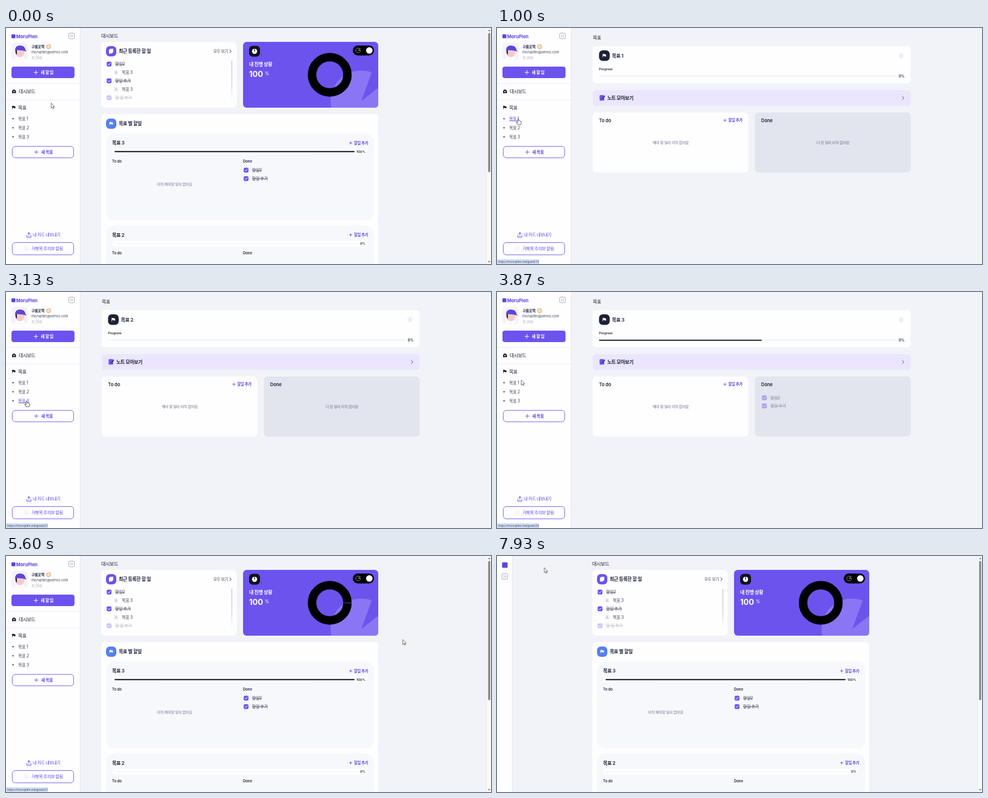
An HTML page that plays this animation: 800 by 391 pixels, repeating every 8000 ms.

```html
<!DOCTYPE html>
<html lang="ko">
<head>
<meta charset="utf-8">
<title>Dashboard tour</title>
<style>
  html, body { margin: 0; width: 100%; height: 100%; overflow: hidden; background: #f1f3f8; }
  svg { display: block; width: 100vw; height: 100vh; }
  text { font-family: Inter, "Noto Sans CJK KR", "Noto Sans CJK", sans-serif; white-space: pre; }
  .url { font-family: "Open Sans", "Noto Sans", sans-serif; }
</style>
</head>
<body>
<svg id="stage" viewBox="0 0 800 391" xmlns="http://www.w3.org/2000/svg"></svg>
<script>
const LOOP = 8000, STEP = 200 / 3;
const INK = '#1b2033', BODY = '#40465a', PURPLE = '#6c53ee', LINK = '#5b45df', CARD = '#fefdff', DARK = '#1e2235';

// --- drawing helpers; text is placed by its vertical centre ---
const text = (x, cy, str, size, { fill = INK, weight = 400, extra = '' } = {}) => {
  const spacing = /[가-힣]/.test(str) ? -0.05 * size : 0;
  return `<text x="${x}" y="${cy + 0.37 * size}" font-size="${size}" font-weight="${weight}" fill="${fill}" letter-spacing="${spacing}" ${extra}>${str}</text>`;
};
const rect = (x, y, w, h, r, fill, extra = '') =>
  `<rect x="${x}" y="${y}" width="${w}" height="${h}" rx="${r}" fill="${fill}" ${extra}/>`;
const circle = (x, y, r, fill, extra = '') => `<circle cx="${x}" cy="${y}" r="${r}" fill="${fill}" ${extra}/>`;
const line = (d, color, width = 1, extra = '') =>
  `<path d="${d}" fill="none" stroke="${color}" stroke-width="${width}" stroke-linecap="round" stroke-linejoin="round" ${extra}/>`;
const group = (id, content, extra = '') => `<g id="${id}" ${extra}>${content}</g>`;
const outline = (x, y, w, h, r, color, width = 0.8) =>
  rect(x, y, w, h, r, 'none', `stroke="${color}" stroke-width="${width}"`);
const plus = (x, y, r, color, width) => line(`M${x - r} ${y}h${2 * r}M${x} ${y - r}v${2 * r}`, color, width);
const chevron = (x, y, r, color, width = 0.9, dir = 1) =>
  line(`M${x - dir * r / 2} ${y - r}l${dir * r} ${r}l${-dir * r} ${r}`, color, width);
const flag = (x, y, s, color) =>
  `<path transform="translate(${x} ${y}) scale(${s})" d="M-3-3H0.3L0.7-2.2H3V1.4H0.3L-0.1.6H-2.2V3H-3Z" fill="${color}"/>`;
const check = (x, y) => rect(x - 4, y - 4, 8, 8, 2, PURPLE) + line(`M${x - 2} ${y}l1.5 1.6l2.7-3`, '#fff', 1);
const task = (x, y, label) => check(x, y) +
  text(x + 9.8, y, label, 7, { fill: BODY, extra: 'text-decoration="line-through"' });
const addTask = (x, y) => plus(x - 5.5, y, 2.2, LINK, 0.8) + text(x, y, '할일 추가', 6.3, { fill: LINK, weight: 600 });

// --- sidebar ---
const toggleButton = (x, y, dir) => outline(x, y, 9.6, 9.4, 2.5, '#8b8f9c', 0.7) +
  [3.6, 6.2].map(dx => chevron(x + dx, y + 4.7, 1.8, '#777b88', 0.6, dir)).join('');

const avatar = rect(9, 25, 27, 28, 6, '#f4f3f9') +
  '<path d="M16 36h14v5q-1 7-7 7t-7-6z" fill="#f6c9c6"/>' +
  '<path d="M15.5 36l2.5 1v7q-3-1-2.5-8z" fill="#2c2844"/>' +
  '<path d="M15 37q0-8 8-8t9 7l2 3q-9-3-19-2z" fill="#5b46d8"/>' +
  '<path d="M16 47q7 4 13 0l2 5H14z" fill="#fff"/>';

const goalLinks = [1, 2, 3].map(n => {
  const y = 135 + 15 * n;
  return circle(11.6, y + 0.3, 1.1, INK) + group('link' + n, text(20, y, '목표 ' + n, 7, { fill: 'inherit' }).replace('fill="inherit"', ''));
}).join('');

const openSidebar =
  rect(9, 10.5, 6.5, 6.5, 1, LINK) + text(16.7, 14, 'MoruPlen', 7.5, { fill: LINK, weight: 700 }) +
  toggleButton(103.3, 8.4, -1) + avatar +
  text(42, 31, '구름호떡', 6.1, { weight: 700 }) + circle(70.3, 31, 4.2, '#e3c99b') + circle(70.3, 31, 2.3, '#f3e5c6') +
  text(42, 40.2, 'moruplen@senvu.com', 5.7, { fill: BODY }) +
  text(42, 49.3, '로그아웃', 5.1, { fill: '#9ca0ac' }) +
  rect(9, 64, 104, 19, 4, PURPLE) + plus(49.3, 73.5, 3.1, '#fff', 0.9) + text(57.3, 73.5, '새 할 일', 7, { fill: '#fff', weight: 700 }) +
  line('M0 92h122M0 119h122', '#e6e7ee', 0.8) +
  '<path d="M10 104l3.2-2.6l3.2 2.6v4.1h-6.4z" fill="#1b2033"/>' + circle(13.2, 105.4, 1.1, '#fff') +
  text(21, 105.2, '대시보드', 7.8, { weight: 500 }) +
  flag(12.8, 131.8, 0.9, INK) + text(20, 131.8, '목표', 7.8, { weight: 500 }) + goalLinks +
  outline(10.4, 196.2, 101.2, 18.8, 5, LINK) + plus(50, 205.6, 3, LINK, 0.8) + text(58, 205.6, '새 목표', 6.8, { fill: LINK, weight: 600 }) +
  line('M34.3 343.7v2.8h6.8v-2.8M37.7 344v-5M35.4 341.2l2.3-2.4l2.3 2.4', LINK, 0.9) +
  text(44, 342.8, '내 카드 내보내기', 7, { fill: LINK, weight: 500 }) +
  outline(10.4, 355.4, 101.2, 20.4, 5, LINK) + rect(29.5, 361.5, 8, 8, 2, '#f7f5fd') +
  text(42, 365.4, '거북목 주의보 알림', 7, { fill: LINK, weight: 500 });

const sidebar =
  '<clipPath id="sideClip"><rect id="sideShape" height="391"/></clipPath>' +
  group('side', rect(0, 0, 122, 391, 0, CARD) + group('sideOpen', openSidebar) +
    group('sideClosed', rect(8.4, 10.5, 9, 9, 1, LINK) + toggleButton(7.8, 29.2, 1)), 'clip-path="url(#sideClip)"') +
  '<path id="sideEdge" d="M0 0V391" stroke="#e1e4ec" stroke-width=".8"/>';

// --- dashboard ---
const subGoal = y => circle(181.6, y, 4, '#f1f2f7') + line(`M181.6 ${y - 2}v2.2l-1.7 1.6M181.6 ${y}l1.7 1.8`, '#8d92a2', 0.7) +
  text(191, y, '목표 3', 7, { fill: BODY });

const goalPanel = (y, n, done) => rect(165, y, 442, 144, 14, '#f6f8fc') +
  text(175, y + 15.4, '목표 ' + n, 8, { weight: 600 }) + addTask(574, y + 15.4) +
  rect(175, y + 25, 421, 9.4, 4.7, '#fff') +
  (done ? rect(179, y + 28.8, 396, 1.9, 1, '#111526') : rect(179, y + 29.4, 402, 0.8, 0.4, '#e9ecf3')) +
  text(done ? 578 : 584, y + 29.7, done ? '100%' : '0%', 5.4, { weight: 600 }) +
  text(175, y + 45.5, 'To do', 5.9, { weight: 600 }) + text(391, y + 45.5, 'Done', 5.9, { weight: 600 }) +
  (done ? task(396, y + 60.5, '할일2') + task(396, y + 74.5, '할일 추가') : '') +
  text(249, y + 83.7, '아직 해야할 일이 없어요', 6.2, { fill: '#737989' });

const dashboard =
  text(157, 13, '대시보드', 8, { weight: 500 }) +
  rect(157, 23, 223.5, 109, 6, CARD) + rect(165, 30, 17, 17, 6, PURPLE) +
  '<path d="M171.8 34.5h5.2v5.2l-2.6 2.6h-4.6v-5.8z" fill="#fff"/>' +
  text(186, 38.5, '최근 등록한 할 일', 7.9, { weight: 600 }) +
  text(342, 38.3, '모두 보기', 6.5, { fill: BODY, weight: 500 }) + chevron(370.3, 38.4, 2.3, INK) +
  task(170, 59.8, '할일2') + subGoal(73.6) + task(170, 87.6, '할일 추가') + subGoal(101.5) +
  `<g opacity=".33">${task(170, 115.4, '할 일 추가')}</g>` +
  rect(371.8, 54, 1.4, 66, 0.7, 'url(#fade)') +
  rect(391, 23, 223, 109, 6, PURPLE) +
  '<path d="M586 121L614 99V126q0 6-6 6H536.6A50.5 50.5 0 0 1 603.2 73.5Z" fill="#8a76f4"/>' +
  rect(401, 29.5, 18, 18, 6, '#12121f') + circle(410, 38.6, 4.3, '#fff') + line('M410 38.6V34.6', '#12121f', 1.2) +
  text(401, 60, '내 진행 상황', 8, { fill: '#fff', weight: 600 }) +
  text(401, 76, '100', 13, { fill: '#fff', weight: 700 }) + text(427, 75.4, '%', 7, { fill: '#fff', weight: 600 }) +
  rect(572, 29, 35, 16.4, 8.2, '#000') + circle(599.3, 37.2, 5.4, '#fff') +
  line('M581 37.2h4a4 4 0 1 1-1.4-3.1zM582.6 35.8l2-1.4', '#b9b9c2', 0.7) +
  circle(534, 77.5, 29.2, 'none', 'id="ring" stroke="#000" stroke-width="14" pathLength="1" transform="matrix(1 0 0 -1 0 155)"') +
  rect(157, 142.5, 457, 270, 6, CARD) + rect(165, 150, 17, 17, 6, '#5680ee') + flag(173.5, 158.5, 0.95, '#fff') +
  text(186, 158.3, '목표 별 할일', 7.9, { weight: 600 }) +
  goalPanel(175, 3, true) + goalPanel(327.3, 2, false) +
  rect(794, 0, 6, 391, 0, '#fafafa') + rect(795.3, 8, 3.4, 231, 1.7, '#85878b') +
  '<path d="M795 5.2l2-2.7l2 2.7zM795 386.2l2 2.7l2-2.7z" fill="#77797d"/>';

// --- goal page ---
const goalPage =
  text(158, 16.3, '목표', 7.8, { weight: 500 }) +
  rect(157.7, 30, 524.6, 61.5, 5, CARD) + rect(168.3, 37, 17.6, 17.6, 6, DARK) + flag(177.1, 45.8, 0.95, '#fff') +
  '<text id="goalTitle" x="189.5" y="48.6" font-size="8" font-weight="600" letter-spacing="-.35" fill="#1b2033"/>' +
  circle(666.4, 46, 4.8, '#f4f5f9') + [-1.8, 0, 1.8].map(d => circle(666.4, 46 + d, 0.5, '#9a9eac')).join('') +
  text(168.3, 68.3, 'Progress', 5.2, { weight: 600 }) +
  rect(168.3, 79.4, 489.5, 0.9, 0.4, '#dde3ec') + rect(168.3, 78.9, 0, 1.9, 0.9, '#111526', 'id="bar"') +
  rect(655, 76, 20, 8, 0, CARD, 'id="barEnd"') +
  '<text id="percent" x="672" y="81.8" text-anchor="end" font-size="5.5" font-weight="600" fill="#1b2033"/>' +
  rect(157.7, 103, 524.6, 26, 5, '#ebe6fd') +
  rect(169.3, 111.3, 7.5, 9, 1, PURPLE) + line('M174 117.2l3.8-4.4', INK, 1.2) +
  text(182, 115.9, '노트 모아보기', 7.9, { weight: 600 }) + chevron(670, 116, 2.5, BODY) +
  rect(157.7, 140, 256.8, 99.5, 6, CARD) + rect(425.4, 140, 257, 99.5, 6, '#e2e5ee') +
  text(168.3, 153.2, 'To do', 7.5, { weight: 600 }) + text(435.8, 153.2, 'Done', 7.5, { weight: 600 }) + addTask(381.5, 153) +
  text(256.7, 189.4, '해야 할 일이 아직 없어요', 6.2, { fill: '#6b7182' }) +
  group('doneEmpty', text(527, 189.4, '다 한 일이 아직 없어요', 6.2, { fill: '#6b7182' })) +
  group('doneList', task(441, 172, '할일2') + task(441, 185.5, '할일 추가'));

const overlays =
  group('status', rect(-2, 383.2, 71, 10, 1.5, '#d0dcf4', 'id="statusBox"') +
    '<text id="statusText" class="url" x="2" y="389.2" font-size="4.8" fill="#3b4252"/>') +
  group('arrow', '<path d="M0 0V8.2L1.9 6.5L3.2 9.3L4.4 8.8L3.2 6H5.7Z" fill="#fff" stroke="#222" stroke-width=".6" stroke-linejoin="round"/>') +
  group('hand', '<path d="M-.9 1Q0-.5.9 1V3.6Q2 3 2.5 4Q3.6 3.6 4 4.6Q5 4.5 5 5.6V7.5L4 10H-.8L-3.2 6.6Q-3.2 5.2-1.7 6L-.9 6.8Z" fill="#fff" stroke="#222" stroke-width=".7" stroke-linejoin="round"/>');

document.getElementById('stage').innerHTML =
  '<defs><linearGradient id="fade" x2="0" y2="1"><stop stop-color="#c5c8d1"/><stop offset=".6" stop-color="#d5d7de"/><stop offset="1" stop-color="#fefdff"/></linearGradient></defs>' +
  rect(0, 0, 800, 391, 0, '#f1f3f8') + group('dashboard', dashboard) + group('goalPage', goalPage) + sidebar + overlays;

// --- timeline ---
const CURSOR = [
  [0, 74.5, 124.5], [130, 74.5, 124.5], [600, 35, 150], [1800, 35, 150], [2130, 33.5, 165], [2650, 33.5, 165],
  [2950, 34, 180], [3530, 34, 180], [3850, 40, 146], [4700, 71.5, 106.5], [5230, 71.5, 106.5], [5370, 40, 178],
  [5590, 654.5, 138.5], [6150, 654.5, 138.5], [6450, 712, 150], [6950, 107, 12.5], [7430, 107, 12.5], [7850, 78, 19.5]
];
const HANDS = [[480, 3650], [4450, 5300], [6900, 7480]];
const STATUS = [[0, ''], [530, 'goals/19'], [2000, 'goals/20'], [2850, 'goals/21'], [3730, 'goals/20'],
  [4530, 'dashboard'], [5400, 'goals/21'], [5990, '']];
const HOVER = [[0, 0], [480, 1], [1960, 2], [2800, 3], [3650, 0]];
const GOAL = [[0, 1], [2530, 2], [3530, 3]];

const $ = Object.fromEntries([...document.querySelectorAll('[id]')].map(el => [el.id, el]));
const clamp = x => Math.min(1, Math.max(0, x));
const span = (t, from, to) => clamp((t - from) / (to - from));
const smooth = x => x * x * (3 - 2 * x);
const latest = (list, t) => list.filter(([start]) => start <= t).pop()[1];
const within = (t, from, to) => t >= from && t < to;
const show = (el, on) => el.setAttribute('display', on ? 'inline' : 'none');
const set = (el, attrs) => { for (const k in attrs) el.setAttribute(k, attrs[k]); };

function cursorAt(t) {
  const next = CURSOR.findIndex(([time]) => time > t);
  if (next < 0) return CURSOR[CURSOR.length - 1].slice(1);
  const [t0, x0, y0] = CURSOR[next - 1], [t1, x1, y1] = CURSOR[next];
  const p = smooth(span(t, t0, t1));
  return [x0 + (x1 - x0) * p, y0 + (y1 - y0) * p];
}

function render(t) {
  const onGoal = within(t, 730, 5300);
  show($.dashboard, !onGoal);
  show($.goalPage, onGoal);

  const sweep = t < 5300 ? 1 : 1 - (1 - span(t, 5330, 5646)) ** 3;
  $.ring.setAttribute('stroke-dasharray', `${sweep} ${sweep < 1 ? 1 : 0}`);

  const loaded = t >= 3930, fadeIn = span(t, 3800, 3940);
  $.goalTitle.textContent = '목표 ' + latest(GOAL, t);
  $.percent.textContent = loaded ? '100%' : '0%';
  $.bar.setAttribute('width', (loaded ? 486 : 490) * smooth(span(t, 3730, 3987)));
  show($.barEnd, loaded);
  show($.doneEmpty, t < 3730);
  set($.doneList, { opacity: fadeIn, transform: `translate(0 ${6 * (1 - fadeIn)})` });

  const hover = latest(HOVER, t);
  for (const n of [1, 2, 3]) {
    const active = n === hover;
    set($['link' + n], { fill: active ? LINK : BODY, 'text-decoration': active ? 'underline' : 'none' });
  }

  const fold = smooth(span(t, 7400, 7600)), width = 122.4 - 96.8 * fold;
  $.sideShape.setAttribute('width', width);
  $.sideEdge.setAttribute('transform', `translate(${width} 0)`);
  show($.sideOpen, fold < 0.5);
  show($.sideClosed, fold >= 0.5);

  const path = latest(STATUS, t);
  show($.status, path);
  $.statusText.textContent = 'https://moruplen.me/' + path;
  $.statusBox.setAttribute('width', path === 'dashboard' ? 76 : 71);

  const [x, y] = cursorAt(t), pointing = HANDS.some(([a, b]) => within(t, a, b));
  show($.arrow, !pointing);
  show($.hand, pointing);
  (pointing ? $.hand : $.arrow).setAttribute('transform', `translate(${x} ${y})`);
}

const begin = performance.now();
function tick() {
  const t = (performance.now() - begin) % LOOP;
  render(Math.floor(t / STEP + 0.06) * STEP);
  requestAnimationFrame(tick);
}
tick();
</script>
</body>
</html>
```
